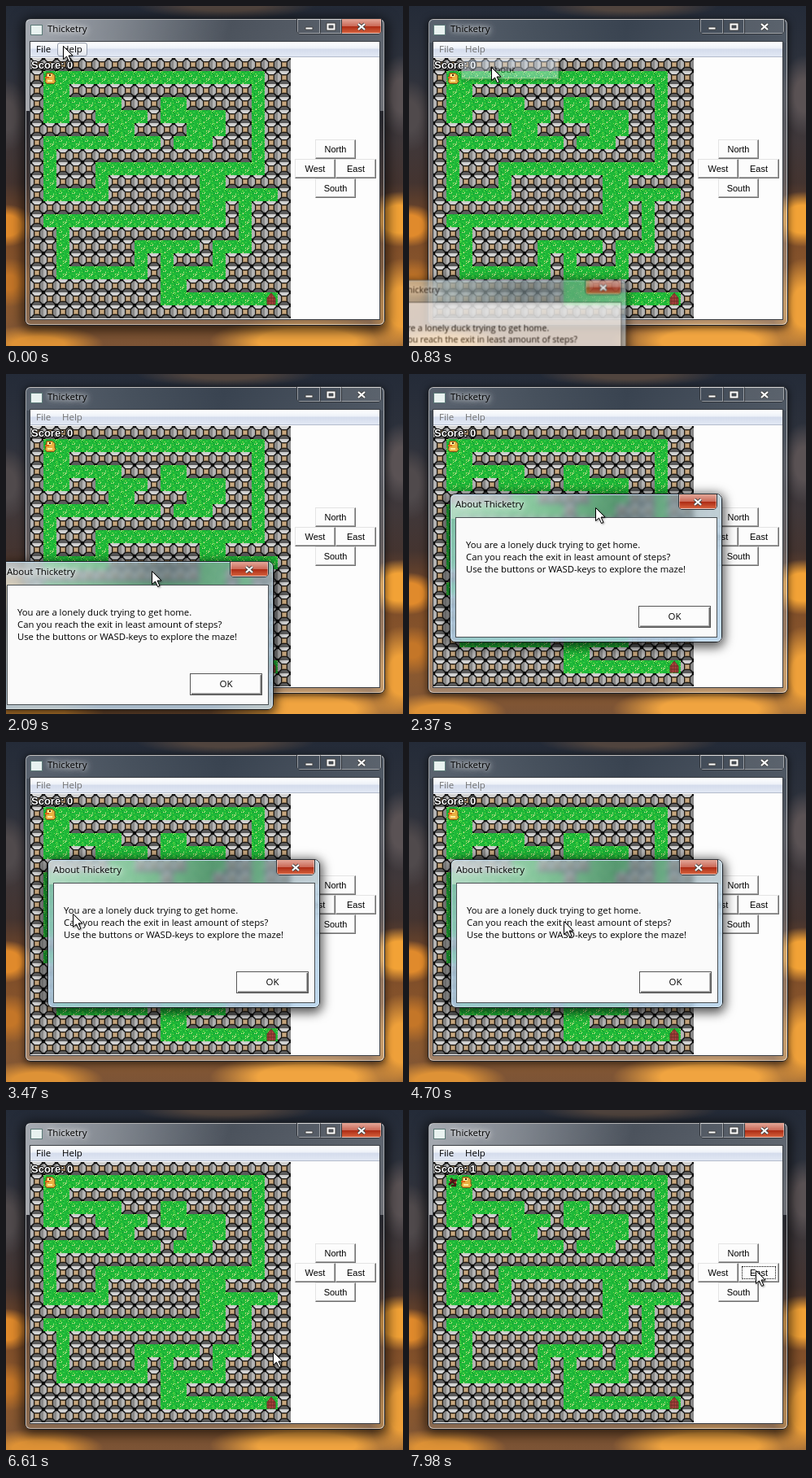
Recreate the animation shown at these times as an HTML page with a canvas. Size 488 by 418 pixels, loop 8 s.

```html
<!DOCTYPE html>
<html lang="en">
<head>
<meta charset="utf-8">
<title>Thicketry</title>
<style>
* { box-sizing: border-box; }
html, body { margin: 0; width: 100%; height: 100%; overflow: hidden; }
body {
  position: relative;
  font: 11.5px/16px "Open Sans", "Noto Sans", sans-serif;
  color: #000;
  background:
    radial-gradient(46px 34px at 484px 262px, #f2a236 50%, transparent),
    radial-gradient(40px 60px at 486px 370px, #eea03a 40%, transparent),
    radial-gradient(36px 26px at 0 270px, #e08a2c 50%, transparent),
    radial-gradient(34px 30px at 4px 340px, #c47628 30%, transparent),
    radial-gradient(120px 30px at 370px 412px, #f0a440 50%, transparent),
    radial-gradient(80px 24px at 40px 416px, #de9236 40%, transparent),
    radial-gradient(110px 16px at 270px 0, #50443e 40%, transparent),
    radial-gradient(30px 50px at 486px 110px, #5a5254 40%, transparent),
    radial-gradient(30px 44px at 0 135px, #504a4c 40%, transparent),
    linear-gradient(#242b38, #2e323c 20%, #40383a 40%, #443430 52%, #7a4a28 64%, #8e5a2e 85%, #7c5436);
}
div, canvas, svg { position: absolute; }
.win { border: 1px solid #1c2026; border-radius: 7px; }
.glass { inset: 0; border: 1px solid #ffffff90; border-radius: 6px; }
.bar { display: flex; top: -1px; height: 20px; border: 1px solid #30343a; border-radius: 0 0 5px 5px; overflow: hidden; }
.bar svg { position: static; border: 1px solid #ffffff70; flex: none; }
.bar svg + svg { border-left-color: #30343a; }
.close { background: linear-gradient(#e0a092, #cb6a58 48%, #ad2b14 52%, #d4603c); }
.title { white-space: nowrap; text-shadow: 0 0 5px #fffc, 0 0 8px #fffc, 0 0 12px #fffa; }

#main { left: 23px; top: 15px; width: 443px; height: 378px; }
#main.active .glass {
  background:
    linear-gradient(100deg, #dfe3e8b0, #b4bac0a0 25%, #70788080 55%, #98a0a880) 0 0 / 100% 112px no-repeat,
    linear-gradient(#0000 112px, #14182090 112px, #50484470 60%, #90847870);
}
#main.idle .glass {
  background:
    linear-gradient(100deg, #8c98a480, #66748080 30%, #4c5a6880 55%, #76828e80) 0 0 / 100% 28px no-repeat,
    linear-gradient(#0000 28px, #7c889460 28px, #98a0a860 50%, #c0b0a080);
}
#main.active { box-shadow: 0 3px 15px 3px #000a; }
#main.idle { box-shadow: 0 2px 9px 1px #0008; }
#main.idle .close { background: #80848840; }
#icon { left: 30px; top: 23px; width: 15px; height: 13px; background: #e8f2f0; border: 1px solid #5c7a78; }
#client { left: 29px; top: 43px; width: 431px; height: 343px; background: #fdfdfd; border: 1px solid #3a3e44; }
#menu { left: 30px; top: 44px; width: 429px; height: 19px; background: linear-gradient(#fff, #edf1f8 45%, #d4dcec 50%, #e2e8f4); border-bottom: 1px solid #b4bccc; }
.idle ~ #menu { color: #707070; }
#help { left: 33px; top: 1px; width: 37px; height: 17px; border: 1px solid transparent; border-radius: 3px; padding-left: 5px; line-height: 14px; }
#help.hot { border-color: #949cac; background: linear-gradient(#fff, #e2e6ee); }
#maze { left: 30px; top: 64px; }
#score {
  left: 31px; top: 65px; white-space: pre; color: #fff;
  font: bold 13px/16px "Liberation Sans", Arial, sans-serif;
  text-shadow: 1px 0 #000, -1px 0 #000, 0 1px #000, 0 -1px #000, 1px 1px #000;
}
.btn {
  width: 50px; height: 24px; background: #fcfcfc; text-align: center;
  border: 1px solid; border-color: #e4e4e4 #707070 #707070 #e4e4e4;
  box-shadow: inset -1px -1px #a8a8a8;
  font: 11px/22px "Liberation Sans", Arial, sans-serif;
}
.btn.down { border-color: #707070 #e4e4e4 #e4e4e4 #707070; box-shadow: inset 1px 1px #a8a8a8; padding: 1px 0 0 1px; }
.btn.focus::after { content: ""; position: absolute; inset: 3px; border: 1px dotted #000; }

#popup { left: 64px; top: 64px; width: 120px; height: 26px; background: linear-gradient(90deg, #f0f0f0 27px, #dcdcdc 27px 28px, #f6f6f6 28px); border: 1px solid #979797; box-shadow: 3px 3px 3px #0006; }
#popup div { inset: 2px; padding-left: 30px; line-height: 19px; border: 1px solid transparent; border-radius: 3px; }
#popup .hot { border-color: #aecff7; background: #d4e5f8b0; }

#dialog { width: 335px; height: 183px; background: #a4bcc870; backdrop-filter: blur(3px); box-shadow: 0 3px 13px 3px #000a; }
#dialog .glass {
  border-color: #d4eaf8c0;
  background:
    linear-gradient(100deg, #e4eef0a0, #b8d0c860 35%, #48606060 60%, #a8bcc470) 0 0 / 100% 29px no-repeat,
    linear-gradient(#0000 29px, #a8c8e070 29px, #b4d4f0b0);
}
#page { left: 6px; top: 28px; width: 322px; height: 148px; background: #fafafa; border: 1px solid #4a5054; }
#text { left: 12px; top: 25px; font-size: 11.3px; line-height: 15px; white-space: pre; }
#ok { left: 224px; top: 108px; width: 89px; height: 27px; border-color: #555; box-shadow: inset 1px 1px #fff, inset -1px -1px #707070, inset -2px -2px #b0b0b0; font: 11.5px/23px "Open Sans", sans-serif; }
#ok.down { box-shadow: inset 1px 1px #888; }
#cursor { left: 0; top: 0; filter: drop-shadow(1px 1px 1px #0006); }
</style>
</head>
<body>
<div id="main" class="win">
  <div class="glass"></div>
  <div class="bar" style="left:333px">
    <svg width="28" height="18"><path d="M9 9h9v3h-9z" fill="#fff" stroke="#444"/></svg>
    <svg width="26" height="18"><path d="M8.500 5.500h8v6h-8z" fill="none" stroke="#444" stroke-width="4"/><path d="M8.500 5.500h8v6h-8z" fill="none" stroke="#fff" stroke-width="2"/></svg>
    <svg class="close" width="49" height="18"><use href="#cross" x="19" y="4"/></svg>
  </div>
</div>
<div id="icon"></div>
<div class="title" style="left:51px;top:20px">Thicketry</div>
<div id="client"></div>
<div id="menu"><div style="left:7px;top:1px">File</div><div id="help">Help</div></div>
<canvas id="maze" width="320" height="320"></canvas>
<svg id="trail" style="left:46px;top:80px" width="16" height="16"><path d="M3 12l4-4 5 4M5 4l4 3 4-1M6 13h6" fill="none" stroke="#4a1414" stroke-width="2.500"/><path d="M4 7h2M10 9h2" stroke="#b02828" stroke-width="2"/></svg>
<svg id="duck" style="top:80px" width="16" height="16">
  <path d="M4 2.500h7l3 3v5l1 2-2 3H4l-2-3 1-3z" fill="#e8b040" stroke="#7a4810"/>
  <path d="M5 4h5v3H5zM5 11h6v2H5z" fill="#fff0a0"/>
  <path d="M2 7h5v2H2z" fill="#e06418"/><path d="M7 4h2v2H7z" fill="#402008"/>
</svg>
<svg style="left:318px;top:352px" width="16" height="16">
  <path d="M8 1l5 6v8H3V7z" fill="#b04440" stroke="#703028"/>
  <path d="M3 7h10M3 11h10M8 2v13M5 6v9M11 6v9" stroke="#6c2c24"/>
</svg>
<div id="score"></div>
<div class="btn" style="left:380px;top:164px">North</div>
<div class="btn" style="left:355px;top:188px">West</div>
<div class="btn" id="east" style="left:405px;top:188px">East</div>
<div class="btn" style="left:380px;top:212px">South</div>
<div id="popup"><div>About</div></div>
<div id="dialog" class="win">
  <div class="glass"></div>
  <div class="title" style="left:6px;top:4px">About Thicketry</div>
  <div class="bar" style="left:280px"><svg class="close" width="46" height="18"><use href="#cross" x="17" y="4"/></svg></div>
  <div id="page">
    <div id="text">You are a lonely duck trying to get home.
Can you reach the exit in least amount of steps?
Use the buttons or WASD-keys to explore the maze!</div>
    <div class="btn" id="ok">OK</div>
  </div>
</div>
<svg id="cursor" width="13" height="21"><path d="M.5.5v16l4-3.500 3 6.500 2.500-1-3-6.500h5z" fill="#fff" stroke="#000"/></svg>
<svg width="0" height="0"><defs><g id="cross"><path d="M1 1l8 7M9 1l-8 7" stroke="#444" stroke-width="4"/><path d="M1 1l8 7M9 1l-8 7" stroke="#fff" stroke-width="2.200"/></g></defs></svg>

<script>
const $ = id => document.getElementById(id);
const rows = `####################
#.................##
#..##############.##
#......###..#####.##
#..##....#.....##.##
######..####...##.##
#.........#...###.##
#.###############.##
#.###.............##
#.###.#######..#####
#.....#######......#
#############..#.###
#..............#.###
##.#############.###
##.#####.....#...###
##.#####.#.###.#####
##.......#.....#####
##########..########
##########.........#
####################`.split("\n");

const g = $("maze").getContext("2d");
const rect = (color, x, y, w, h = w) => { g.fillStyle = color; g.fillRect(x, y, w, h); };
const random = n => Math.abs(Math.sin(n * 127.1 + 3.7) * 43758.5) % 1;

function wall() {
  rect("#0c0c0c", 0, 0, 16);
  // four bevels with dark seams, light from above
  ["#d0d0d0", "#888", "#5c5c5c", "#b4b4b4"].forEach((color, i) => {
    g.save();
    g.translate(8, 8);
    g.rotate(i * Math.PI / 2);
    g.fillStyle = color;
    g.beginPath();
    g.moveTo(-5.5, -8); g.lineTo(5.5, -8); g.lineTo(6, -7);
    g.lineTo(3, -4); g.lineTo(-3, -4); g.lineTo(-6, -7);
    g.fill();
    g.restore();
  });
  rect("#1c1814", 4, 4, 8);
  rect("#8c7454", 5, 5, 6);
  rect("#c8a880", 6, 6, 4);
}

function grass() {
  rect("#1eb838", 0, 0, 16);
  for (let i = 0; i < 56; i++) {
    const color = ["#7cdc44", "#0e9a30", "#e4e89c", "#44d04c"][i % 4];
    rect(color, random(i) * 16 | 0, random(i + 99) * 16 | 0, 1);
  }
}

rows.forEach((row, y) => [...row].forEach((cell, x) => {
  g.setTransform(1, 0, 0, 1, x * 16, y * 16);
  cell == "#" ? wall() : grass();
}));

// bursts of evenly spaced updates: start, end, steps
const bursts = [[0, 0, 1], [150, 550, 4], [830, 1820, 8], [1970, 2920, 8], [3070, 4040, 8],
  [4160, 5090, 8], [5240, 6060, 7], [6340, 6610, 3], [6890, 7550, 6], [7830, 7980, 2]];
const pointer = [[0, 70, 49], [280, 72, 52], [550, 101, 74], [970, 101, 76], [1250, 112, 170],
  [1680, 131, 330], [1820, 132, 337], [1970, 145, 310], [2110, 180, 240], [2240, 214, 186],
  [2377, 229, 164], [2520, 231, 161], [2660, 231, 161], [2920, 211, 228], [3070, 180, 228],
  [3340, 74, 209], [3486, 82, 211], [4040, 208, 212], [4560, 287, 213], [4830, 88, 228],
  [5090, 160, 230], [5240, 178, 231], [5520, 255, 258], [5787, 319, 280], [6060, 328, 297],
  [6750, 328, 297], [7290, 414, 182], [7550, 426, 197]];
const place = [[0, -58, 331], [830, -58, 331], [970, -55, 331], [1680, -55, 331], [1820, -55, 327],
  [1970, -42, 300], [2110, -5, 228], [2240, 33, 170], [2377, 50, 147], [2520, 51, 144]];

// each update may come a little ahead of its even place in the burst
function snap(t) {
  const [start, end, n] = bursts.findLast(b => t >= b[0]);
  if (t >= end) return end;
  const step = (end - start) / (n - 1);
  return Math.min(end, start + Math.floor((t - start + 20) / step) * step);
}

function at(keys, t) {
  const i = keys.findLastIndex(k => t >= k[0]);
  const a = keys[i], b = keys[i + 1] || a;
  const p = b == a ? 0 : (t - a[0]) / (b[0] - a[0]);
  return [1, 2].map(j => Math.round(a[j] + (b[j] - a[j]) * p));
}

const move = (id, [x, y], extra = "") => $(id).style.transform = `translate(${x}px,${y}px) ${extra}`;
const fade = (id, alpha) => {
  $(id).style.opacity = alpha;
  $(id).style.visibility = alpha ? "visible" : "hidden";
};
const mark = (el, name, on) => el.classList.toggle(name, on);

function frame(now) {
  const t = snap(now % 8000);
  const idle = t >= 830 && t < 6470;
  const opening = t < 970, closing = t >= 6470;
  const moved = t >= 7980;

  mark($("main"), "idle", idle);
  mark($("main"), "active", !idle);
  mark($("help"), "hot", t < 830);
  fade("popup", t < 280 || t >= 970 ? 0 : t < 830 ? 1 : .4);
  mark($("popup").firstChild, "hot", t >= 540);

  fade("dialog", t < 830 || t >= 6610 ? 0 : opening ? .72 : closing ? .45 : 1);
  move("dialog", at(place, t), opening || closing ? "scale(.94)" : "");
  mark($("ok"), "down", t >= 6340);

  mark($("east"), "down", t >= 7830 && !moved);
  mark($("east"), "focus", t >= 7830);
  fade("trail", +moved);
  $("duck").style.left = (moved ? 62 : 46) + "px";
  $("score").textContent = "Score: " + +moved;
  move("cursor", at(pointer, t));
  requestAnimationFrame(frame);
}
requestAnimationFrame(frame);
</script>
</body>
</html>
```
